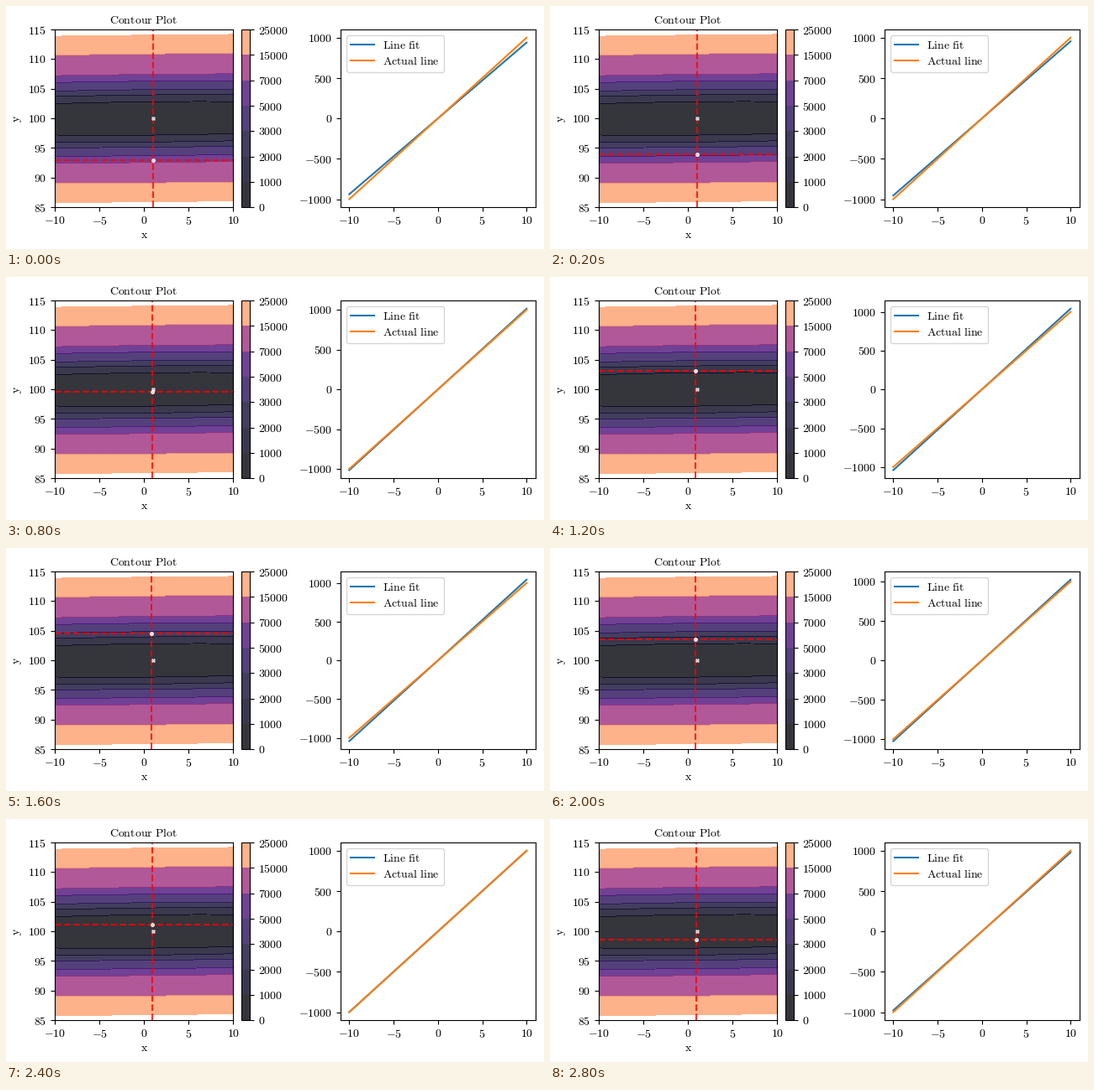
A matplotlib script that plays this animation: 640 by 290 pixels, repeating every 3 s.

```python
import numpy as np
import matplotlib.pyplot as plt
from matplotlib.animation import FuncAnimation

plt.rcParams.update({
    "font.family": "Liberation Serif",
    "font.size": 10,
    "mathtext.fontset": "cm",
})

W, H, DPI = 640, 290, 100
FRAMES, INTERVAL = 15, 200

# quadratic loss around the true intercept and slope
BIAS, SLOPE = 1, 100
A, B, C = 126.3, 1, -1.85
RATE, MOMENTUM = 0.001, 0.9
LEVELS = [0, 1000, 2000, 3000, 5000, 7000, 15000, 25000]


def loss(b, w):
    u, v = b - BIAS, w - SLOPE
    return A * v**2 + 2 * C * u * v + B * u**2


def descend(steps, b=1.0, w=93.0):
    """Gradient descent with momentum; returns the visited points."""
    pos, vel = np.array([b, w]), np.zeros(2)
    hess = np.array([[B, C], [C, A]])
    path = [pos]
    for _ in range(steps):
        vel = MOMENTUM * vel - RATE * hess @ (pos - [BIAS, SLOPE])
        pos = pos + vel
        path.append(pos)
    return np.array(path)


def rm(text):
    return r"$\mathrm{%s}$" % text.replace(" ", r"\ ")


def number(value, _=None):
    return f"${value:.0f}$"


def add_axes(left, width):
    return fig.add_axes([left / W, 49.85 / H, width / W, 212 / H])


fig = plt.figure(figsize=(W / DPI, H / DPI), dpi=DPI, facecolor="white")
left = add_axes(58.17, 212)
cax = add_axes(279.8, 10.6)
right = add_axes(397.8, 232)

# loss surface
bs, ws = np.meshgrid(np.linspace(-10, 10, 200), np.linspace(85, 115, 300))
filled = left.contourf(bs, ws, loss(bs, ws), levels=LEVELS, cmap="magma", alpha=0.8)
bar = fig.colorbar(filled, cax=cax, ticks=LEVELS)
bar.ax.set_yticks(LEVELS, [number(v) for v in LEVELS])
left.set(xlim=(-10, 10), ylim=(85, 115))
left.set_xticks(range(-10, 11, 5))
left.set_yticks(range(85, 116, 5))
left.set_title(rm("Contour Plot"), fontsize=10, x=0.496, pad=5.4)
left.set_xlabel(rm("x"), labelpad=2.6)
left.set_ylabel(rm("y"))

guide = dict(color="red", ls="--", lw=1.5, alpha=0.8)
vline = left.axvline(BIAS, **guide)
hline = left.axhline(SLOPE, **guide)
mark = dict(color="white", s=7, alpha=0.8, zorder=3)
left.scatter([BIAS], [SLOPE], marker="x", **mark)
dot = left.scatter([BIAS], [SLOPE], marker="o", **mark)

# fitted line
xs = np.array([-10, 10])
actual = SLOPE * xs + BIAS
fit, = right.plot(xs, actual, label=rm("Line fit"))
right.plot(xs, actual, label=rm("Actual line"))
right.set_xlim(-11, 11)
right.set_xticks(range(-10, 11, 5))
right.set_yticks(range(-1000, 1001, 500))
right.legend(loc="upper left", labelspacing=0.4, handletextpad=0.72)

for ax in (left, right):
    ax.xaxis.set_major_formatter(number)
    ax.yaxis.set_major_formatter(number)

path = descend(FRAMES)


def update(i):
    b, w = path[i]
    vline.set_xdata([b, b])
    hline.set_ydata([w, w])
    dot.set_offsets([[b, w]])

    # the line shows the parameters after this step
    b, w = path[i + 1]
    ys = w * xs + b
    fit.set_ydata(ys)
    low, high = min(ys[0], actual[0]), max(ys[1], actual[1])
    pad = 0.05 * (high - low)
    right.set_ylim(low - pad, high + pad)
    return vline, hline, dot, fit


anim = FuncAnimation(fig, update, frames=FRAMES, interval=INTERVAL,
                     repeat=True, repeat_delay=0, blit=False)
plt.show()
```
